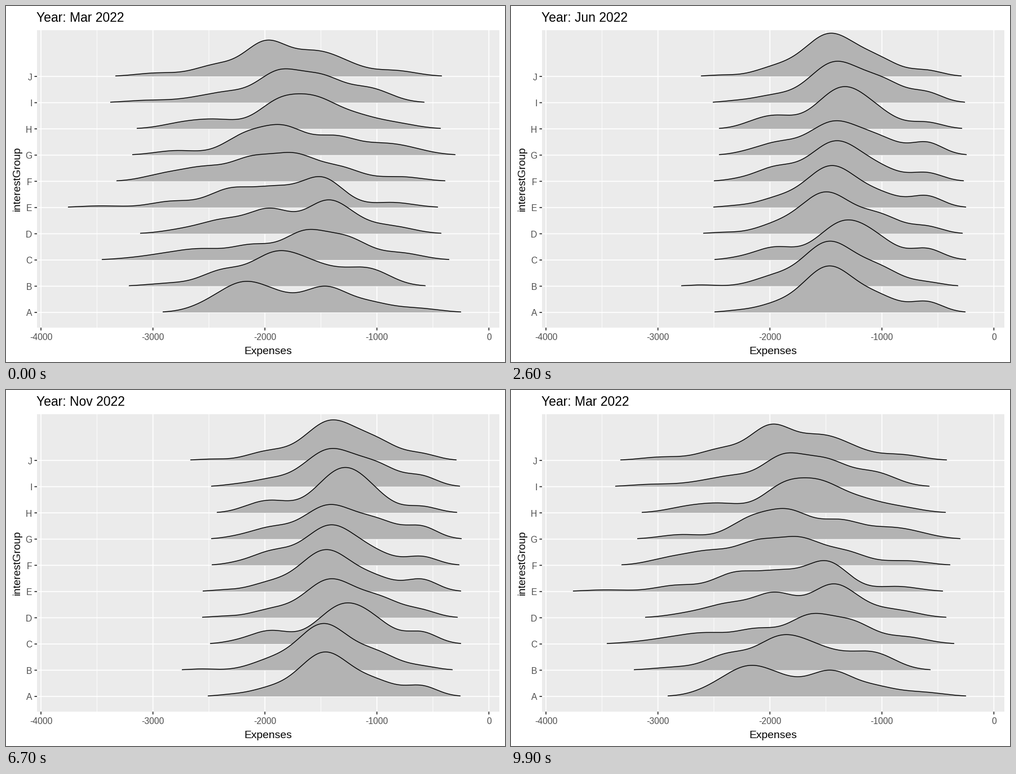
Write a matplotlib script that moves like this. It is 885 px wide and 632 px high and loops after 10000 ms.

```python
import numpy as np
import matplotlib.pyplot as plt
from matplotlib.animation import FuncAnimation
from matplotlib.patches import Polygon, Rectangle

W, H, DPI = 885, 632, 64
PX = 72 / DPI                      # points per pixel
FRAMES, INTERVAL = 100, 100
BASE, STEP = 544, 46.55            # baseline of A, distance between rows
CUT = 0.9                          # lowest height drawn
GRID = np.arange(90, 841)
MONTHS = ["Mar 2022", "Apr 2022", "May 2022", "Jun 2022", "Jul 2022", "Aug 2022",
          "Sep 2022", "Oct 2022", "Nov 2022", "Dec 2022", "Jan 2023", "Feb 2023"]
STARTS = [5, 14, 23, 32, 41, 49, 56, 64, 72, 80, 88, 96]
plt.rcParams["font.family"] = "Liberation Sans"

# First month: centre and height of the bumps that make up each density
SPREAD = {
    "A": [(368, 15), (422, 42), (480, 24), (566, 43), (645, 16), (730, 7)],
    "B": [(288, 5), (385, 27), (470, 46), (524, 32), (580, 18), (645, 28)],
    "C": [(230, 3), (290, 9), (350, 16), (436, 25), (530, 47), (605, 36), (700, 12)],
    "D": [(315, 7), (385, 22), (468, 42), (568, 52), (615, 14), (686, 12)],
    "E": [(168, 3), (295, 11), (397, 31), (475, 31), (560, 52), (685, 9)],
    "F": [(282, 12), (352, 22), (436, 38), (512, 43), (592, 23), (700, 8)],
    "G": [(303, 8), (425, 33), (494, 45), (584, 31), (665, 15), (715, 9)],
    "H": [(315, 10), (378, 14), (484, 45), (550, 45), (620, 20), (690, 9)],
    "I": [(250, 4), (335, 6), (395, 16), (484, 52), (560, 42), (645, 24)],
    "J": [(268, 6), (372, 19), (462, 60), (545, 35), (600, 18), (690, 10)],
}

# Later months: outlier and peak positions, then the heights of
# the left shoulder, peak, right shoulder and tail
TYPICAL = {
    "A": (395, 562, 12, 77, 23, 18),
    "B": (340, 560, 15, 78, 28, 6),
    "C": (395, 590, 22, 64, 22, 19),
    "D": (370, 566, 13, 70, 30, 11),
    "E": (380, 564, 13, 73, 20, 20),
    "F": (390, 574, 23, 66, 17, 15),
    "G": (400, 572, 19, 58, 28, 20),
    "H": (420, 589, 22, 75, 16, 11),
    "I": (400, 571, 11, 67, 33, 16),
    "J": (365, 568, 15, 71, 29, 10),
}
GROUPS = list(TYPICAL)


def bump(centre, height, width):
    return height * np.exp(-((GRID - centre) / width) ** 2 / 2)


def spread(group):
    return sum(bump(x, h, 38) for x, h in SPREAD[group])


def typical(group, k, rng):
    """Density in month k: the group's usual shape, drifting and wobbling."""
    far, peak, *heights = TYPICAL[group]
    left, top, right, tail = heights * (1 + 0.04 * rng.normal(size=4))
    drift = 3 - 15 * np.exp(1 - k)
    sway = drift + 3 * rng.normal(size=3)
    return (bump(far + 3 * sway[0], 2.3, 25) + bump(465 + sway[0], left, 36)
            + bump(peak + sway[1], top, 45) + bump(655 + sway[2], right, 38)
            + bump(738, tail, 28))


def mix(a, b, p):
    return a + (b - a) * p


rng = np.random.default_rng(4)
shapes = [np.array([spread(g) for g in GROUPS])]
shapes += [np.array([typical(g, k, rng) for g in GROUPS])
           for k in range(1, len(MONTHS))]

fig = plt.figure(figsize=(W / DPI, H / DPI), dpi=DPI, facecolor="white")
ax = fig.add_axes([0, 0, 1, 1])
ax.set(xlim=(0, W), ylim=(H, 0))
ax.axis("off")


def label(x, y, s, size, color="black", **kw):
    return ax.text(x, y, s, fontsize=size * PX, color=color, va="baseline", **kw)


def line(x, y, color, width, z=1):
    return ax.plot(x, y, color=color, lw=width * PX, zorder=z,
                   solid_capstyle="butt", snap=False)[0]


def x_pos(value):
    return 856.4 + value * 0.1986


ax.add_patch(Rectangle((55, 43), 820, 528, color="#EBEBEB", lw=0, zorder=0))
for v in range(-3500, 0, 1000):
    line([x_pos(v)] * 2, [43, 571], "white", 0.9)
for v in range(-4000, 1, 1000):
    x = x_pos(v)
    line([x, x], [43, 571], "white", 1.75)
    line([x, x], [571, 576], "#333333", 1.75)
    label(x, 593, str(v), 15.6, "#4D4D4D", ha="center")

rows = []
for i, g in enumerate(GROUPS):
    y = BASE - STEP * i
    line([55, 875], [y, y], "white", 1.75)
    line([50.5, 55], [y, y], "#333333", 1.75)
    label(46.5, y + 6.5, g, 15.6, "#4D4D4D", ha="right")
    z = 30 - 2 * i
    fill = ax.add_patch(Polygon([(0, y), (1, y), (1, y)], fc="#B3B3B3", lw=0,
                                ec="none", zorder=z))
    rows.append((y, fill, line([], [], "black", 1.45, z + 1)))

label(465, 618, "Expenses", 19.2, ha="center")
label(25, 307, "interestGroup", 19, ha="center", rotation=90, rotation_mode="anchor")
title = label(54.5, 28, "", 22.9, ha="left")


def state(i):
    """Month before, month after and progress between them."""
    k = sum(s <= i for s in STARTS)
    if k == 0:
        return 0, 0, 1
    start = STARTS[k - 1]
    steps = 3 if start == 49 else 4
    return k - 1, k % len(MONTHS), min(1, (i - start + 1) / steps)


def draw(i):
    a, b, p = state(i)
    title.set_text("Year: " + MONTHS[b if p >= 0.5 else a])
    for (y, fill, edge), h in zip(rows, mix(shapes[a], shapes[b], p)):
        shown = h >= CUT
        top = y - np.where(shown, h, 0)
        fill.set_xy([(GRID[0], y), *zip(GRID, top), (GRID[-1], y)])
        edge.set_data(GRID, np.where(shown, top, np.nan))
    return [title]


anim = FuncAnimation(fig, draw, frames=FRAMES, interval=INTERVAL,
                     repeat=True, repeat_delay=0, blit=False)
plt.show()
```
